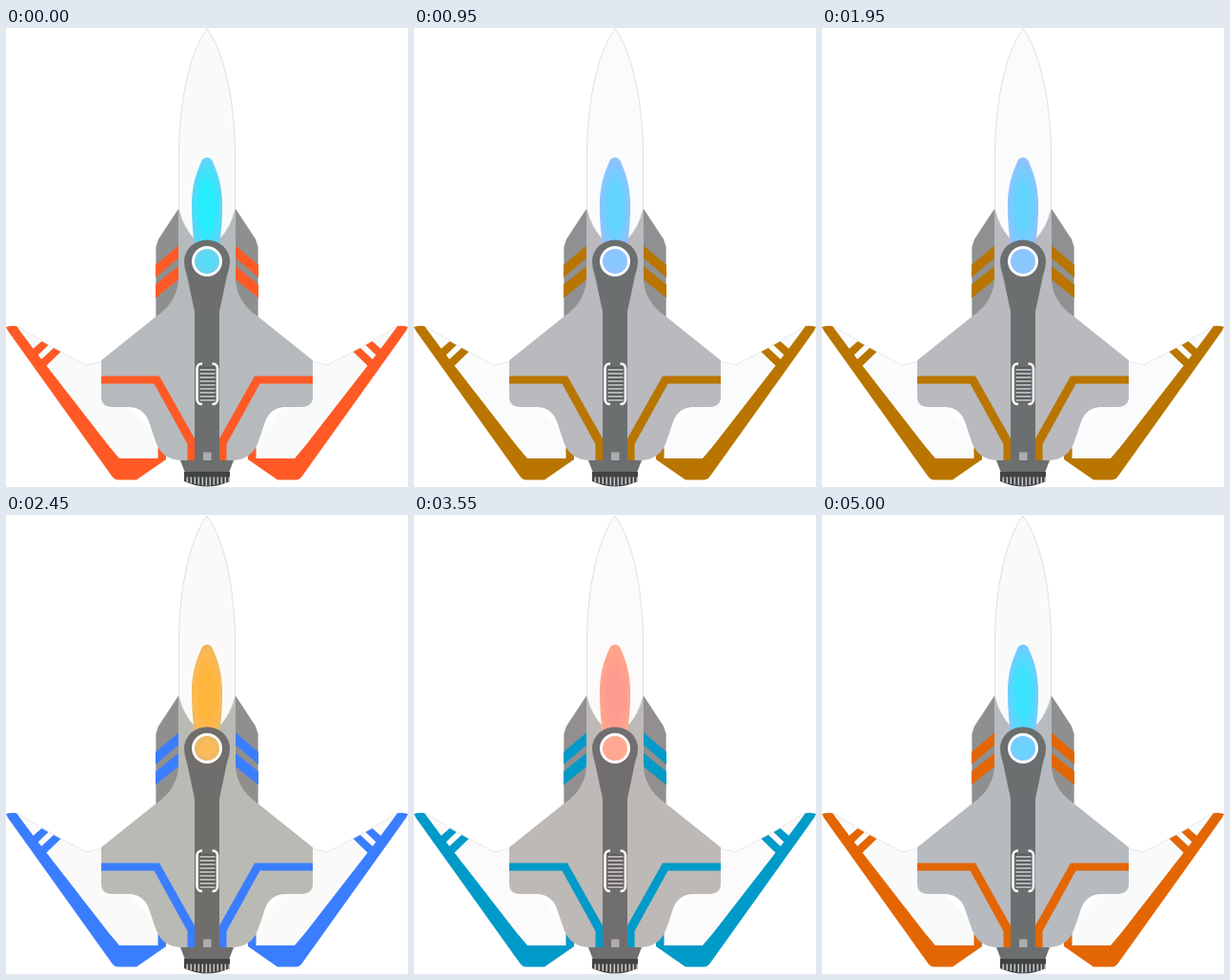
An HTML page with a canvas for the animation above (5050 ms loop, 422 px wide and 482 px high).

```html
<!DOCTYPE html>
<html lang="en">
<head>
<meta charset="utf-8">
<title>Spaceship</title>
<style>
html, body { margin: 0; width: 100%; height: 100%; overflow: hidden; background: #fff; }
canvas { display: block; width: 422px; height: 482px; }
</style>
</head>
<body>
<canvas id="ship" width="422" height="482"></canvas>
<script>
const LOOP = 5050, STEP = 50;
const canvas = document.getElementById('ship');
const ctx = canvas.getContext('2d');
const ORANGE = '#ff5a25', HULL = '#b6babd', POD = '#8e9090',
      SPINE = '#6c6f6e', PALE = '#f9fbfb', DARK = '#414343';

function fill(path, color) {
  ctx.fillStyle = color;
  ctx.fill(new Path2D(path));
}

function disc(x, y, r, color) {
  ctx.fillStyle = color;
  ctx.beginPath();
  ctx.arc(x, y, r, 0, Math.PI * 2);
  ctx.fill();
}

// Fills a path with an elliptical gradient centred on x, y.
function glow(path, x, y, rx, ry, inner, outer) {
  ctx.save();
  ctx.clip(new Path2D(path));
  ctx.translate(x, y);
  ctx.scale(rx, ry);
  const g = ctx.createRadialGradient(0, 0, 0, 0, 0, 1);
  g.addColorStop(0.45, inner);
  g.addColorStop(1, outer);
  ctx.fillStyle = g;
  ctx.fillRect(-2, -2, 4, 4);
  ctx.restore();
}

// Draws the left half, then its mirror image.
function bothSides(draw) {
  draw();
  ctx.save();
  ctx.translate(422, 0);
  ctx.scale(-1, 1);
  draw();
  ctx.restore();
}

function wing() {
  const sheet = 'M0 314L11 313L56 339L84 354L102 350L130 398L168 440V453L137 474H117Q113 474 110 469Z';
  fill(sheet, PALE);
  ctx.strokeStyle = '#dcdede';
  ctx.lineWidth = 0.7;
  ctx.stroke(new Path2D('M11 313L56 339L84 354L102 350'));
  fill('M0 314Q5 312 11 313L28 336L108 439L119 452H159.500V440L168 444V453L137 474.500H117Q113 474 110 469L2 318Z', ORANGE);
  fill('M26 339L37.500 329L44.500 333L32 345Z', ORANGE);
  fill('M36 349L50 336L57.500 340L42 355Z', ORANGE);
}

function hull() {
  fill('M212 190H181L160 222L157.500 230V303L100 349V387Q100 398 112 398H130Q144 399 149.500 412L157 434Q163 453 184 454H212Z', HULL);
  fill('M181 190L160 222L157.500 230V303Q181 287 181 262Z', POD);
  fill('M181 228.500V241.500L157 262V249Z', ORANGE);
  fill('M181 250V264L157 283.500V269.500Z', ORANGE);
  fill('M100 365.500H161L199 433V454H190.500V437L155.500 373.500H100Z', ORANGE);
}

function nose() {
  const shape = new Path2D('M211 1C191 28 181.500 83 181.500 135V190Q186 210 199 223H223Q236 210 240.500 190V135C240.500 83 231 28 211 1Z');
  ctx.fillStyle = PALE;
  ctx.fill(shape);
  ctx.strokeStyle = '#d0d3d3';
  ctx.lineWidth = 0.7;
  ctx.stroke(shape);
  glow('M211 136Q216 136 218 143C225 158 227.500 174 227 190Q227 208 224 228H198Q195 208 195 190C194.500 174 197 158 204 143Q206 136 211 136Z',
    211, 188, 17, 52, '#26eeff', '#64d2f4');
}

function vent() {
  ctx.fillStyle = '#5c5f5e';
  ctx.fillRect(203, 356, 17, 37);
  ctx.fillStyle = '#b8bcbc';
  for (let y = 358; y < 393; y += 4) ctx.fillRect(203.5, y, 16, 1.8);
  ctx.strokeStyle = PALE;
  ctx.lineWidth = 2.6;
  ctx.beginPath();
  ctx.roundRect(200.5, 352.5, 21.5, 42.5, 5);
  ctx.stroke();
  ctx.fillStyle = SPINE;
  ctx.fillRect(206, 350, 10.5, 5);
  ctx.fillRect(206, 393, 10.5, 5);
}

function engine() {
  fill('M183 454H239L234 467H188Z', SPINE);
  fill('M187 466H235V476Q211 487 187 476Z', DARK);
  ctx.fillStyle = '#c4c7c7';
  for (let x = 189.5; x < 234; x += 4) {
    const drop = 9.5 - Math.abs(x - 210.5) / 6;
    ctx.fillRect(x, 471.5, 1.6, drop);
  }
}

function drawShip() {
  ctx.fillStyle = '#fff';
  ctx.fillRect(0, 0, 422, 482);
  bothSides(wing);
  bothSides(hull);
  nose();
  engine();
  fill('M187 245A24 22.500 0 0 1 235 245Q235 252 232 260L224 298V454H198V298L190 260Q187 252 187 245Z', SPINE);
  disc(211, 245, 16, '#fbfdfd');
  glow('M198 245A13 13 0 0 1 224 245A13 13 0 0 1 198 245Z', 211, 245, 13, 13, '#58dcf6', '#6ad2ec');
  vent();
  ctx.fillStyle = '#a9adaf';
  ctx.fillRect(207, 445.5, 8.5, 8.5);
}

// One turn of the colour wheel per second, starting just before the second step.
function hueAt(ms) {
  const step = Math.floor((ms % LOOP) / STEP);
  return step ? 16 - step * 18 : 0;
}

function frame() {
  canvas.style.filter = `hue-rotate(${hueAt(performance.now())}deg)`;
  requestAnimationFrame(frame);
}

drawShip();
frame();
</script>
</body>
</html>
```
